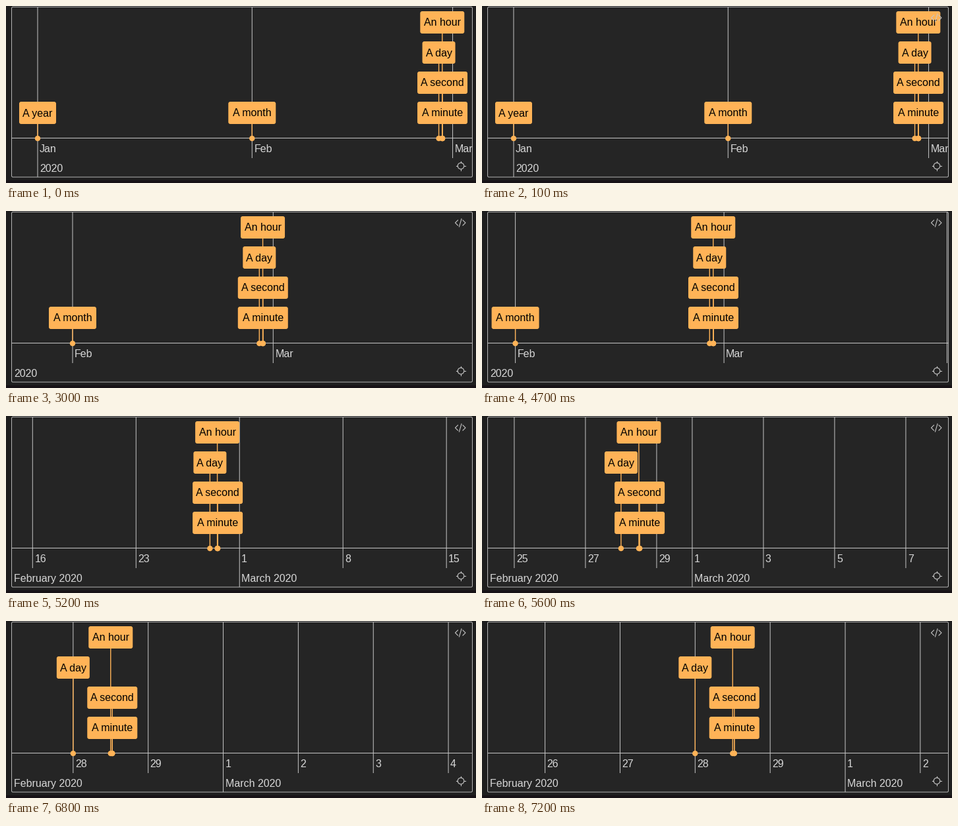
Write a matplotlib script that moves like this. It is 713x270 px and loops after 8 s.

```python
import numpy as np
import matplotlib.pyplot as plt
from matplotlib.animation import FuncAnimation
from matplotlib.lines import Line2D
from matplotlib.patches import Circle, FancyBboxPatch, Rectangle

W, H, DPI = 713, 270, 100
STEP, FRAMES = 100, 80
PT = 72 / DPI

BACK, PANEL, STRIP = "#1e1e1e", "#252525", "#171216"
TICK, BORDER, LABEL, AMBER = "#c6c6c6", "#b4b4b4", "#d6d6d6", "#ffb357"

LEFT, RIGHT, TOP, BOTTOM = 8.5, 707.5, 1.5, 261
AXIS_Y, TICK_END = 201.5, 232

# Days are counted from 1 January 2020.
MONTHS = [("January", 31), ("February", 29), ("March", 31), ("April", 30)]
STARTS = np.cumsum([0] + [days for _, days in MONTHS[:-1]])
MARCH = 60

# Name, day, top of the box, width of the box
EVENTS = [
    ("A year", 0, 146, 56),
    ("A month", 31, 146, 72),
    ("A day", 58, 54, 50),
    ("An hour", 58.5, 8, 67),
    ("A second", 58.522, 100, 76),
    ("A minute", 58.522, 146, 76),
]

ANCHOR_X, ANCHOR_DAY = 379.3, 1.118
ZOOM_TIMES = [4600, 4700, 4800, 4900, 5600, 5700, 5800, 5900, 6000, 6100]
ZOOM_SCALES = [10.493, 10.914, 11.6, 11.6, 54, 66, 80.5, 95, 107, 113.85]

fig = plt.figure(figsize=(W / DPI, H / DPI), dpi=DPI, facecolor=BACK)
ax = fig.add_axes([0, 0, 1, 1])
ax.set_xlim(0, W)
ax.set_ylim(H, 0)
ax.axis("off")

clip = Rectangle((LEFT, TOP), RIGHT - LEFT, BOTTOM - TOP, fc=PANEL, ec="none")
ax.add_patch(clip)
ax.add_patch(Rectangle((0, 266), W, H - 266, fc=STRIP, ec="none"))
ax.add_patch(FancyBboxPatch(
    (LEFT, TOP), RIGHT - LEFT, BOTTOM - TOP, fc="none", ec=BORDER, lw=PT,
    boxstyle="round,pad=0,rounding_size=2", zorder=9))

live = []


def put(artist):
    """Add an artist that is clipped to the panel and lasts one frame."""
    ax.add_artist(artist)
    artist.set_clip_path(clip)
    live.append(artist)


def line(x0, y0, x1, y1, color, width=1.0, z=2):
    put(Line2D([x0, x1], [y0, y1], color=color, lw=width * PT, zorder=z,
               snap=False, solid_capstyle="butt"))


def text(x, y, string, color, ha="left", z=4):
    live.append(ax.text(x, y, string, color=color, ha=ha, va="baseline",
                        family="Liberation Sans", size=16 * PT, zorder=z,
                        clip_on=True))
    live[-1].set_clip_path(clip)


def stroke(points, width=1.1):
    xs, ys = zip(*points)
    art = Line2D(xs, ys, color=TICK, lw=width * PT, zorder=10)
    ax.add_line(art)
    return art


def add_icons():
    cx, cy = 690, 244
    ax.add_patch(Circle((cx, cy), 4.8, fc="none", ec=TICK, lw=1.1 * PT, zorder=10))
    for dx, dy in [(1, 0), (-1, 0), (0, 1), (0, -1)]:
        stroke([(cx + 4.8 * dx, cy + 4.8 * dy), (cx + 7 * dx, cy + 7 * dy)])
    return [
        stroke([(685.5, 14), (681.5, 18), (685.5, 22)]),
        stroke([(691, 12), (687.5, 24)]),
        stroke([(693, 14), (697, 18), (693, 22)]),
    ]


code_icon = add_icons()


def view(t):
    """Pixels per day and the place of 1 March at time t."""
    scale = np.exp(np.interp(t, ZOOM_TIMES, np.log(ZOOM_SCALES)))
    if t < 2300:
        drag = 310
    else:
        drag = 233 * max(0, 1 - (t - 2300) / 1100) ** 1.8
    u = np.clip((t - 6600) / 600, 0, 1)
    drag += 299 * u * u * (3 - 2 * u)
    return scale, ANCHOR_X - ANCHOR_DAY * scale + drag


def ticks(scale):
    """Small and large ticks as (day, label) for a scale."""
    if scale * 7 < 100:
        small = [(s, name[:3]) for s, (name, _) in zip(STARTS, MONTHS)]
        return small, [(0, "2020")]
    large = [(s, f"{name} 2020") for s, (name, _) in zip(STARTS, MONTHS)]
    dates = [(s + d, d) for s, (_, n) in zip(STARTS, MONTHS) for d in range(n)]
    if scale >= 100:
        shown = dates
    elif scale >= 50:
        shown = [(day, d) for day, d in dates if d % 2 == 0]
    else:
        shown = [(day, d) for day, d in dates if day % 7 == MARCH % 7]
    return [(day, str(d + 1)) for day, d in shown], large


def draw_scale(place, scale):
    small, large = ticks(scale)
    for day, label in small:
        x = place(day)
        if LEFT - 40 < x < RIGHT + 2:
            line(x, TOP, x, TICK_END, TICK)
            text(x + 3, 223, label, LABEL)
    for i, (day, label) in enumerate(large):
        x = place(day)
        if x > RIGHT:
            continue
        if x > LEFT:
            line(x, TICK_END, x, BOTTOM, TICK)
        ended = i + 1 < len(large) and place(large[i + 1][0]) < 120
        if not ended:
            text(max(x + 3, 12), 253, label, LABEL)
    line(LEFT, AXIS_Y, RIGHT, AXIS_Y, TICK)


def draw_event(x, name, top, width):
    if not LEFT - width < x < RIGHT + width:
        return
    line(x, top + 30, x, AXIS_Y, AMBER, 1.4, z=3)
    put(Circle((x, 202), 4.2, fc=AMBER, ec="none", zorder=5))
    put(FancyBboxPatch((x - width / 2, top), width, 34, fc=AMBER, ec="none",
                       boxstyle="round,pad=0,rounding_size=3", zorder=6))
    text(x, top + 22.5, name, "black", ha="center", z=7)


def draw(frame):
    while live:
        live.pop().remove()
    scale, march = view(frame * STEP)

    def place(day):
        return march + (day - MARCH) * scale

    draw_scale(place, scale)
    for name, day, top, width in EVENTS:
        draw_event(place(day), name, top, width)
    for part in code_icon:
        part.set_visible(frame > 0)
    return live


anim = FuncAnimation(fig, draw, frames=FRAMES, interval=STEP, repeat=True,
                     repeat_delay=0, init_func=lambda: draw(0), blit=False)
plt.show()
```
